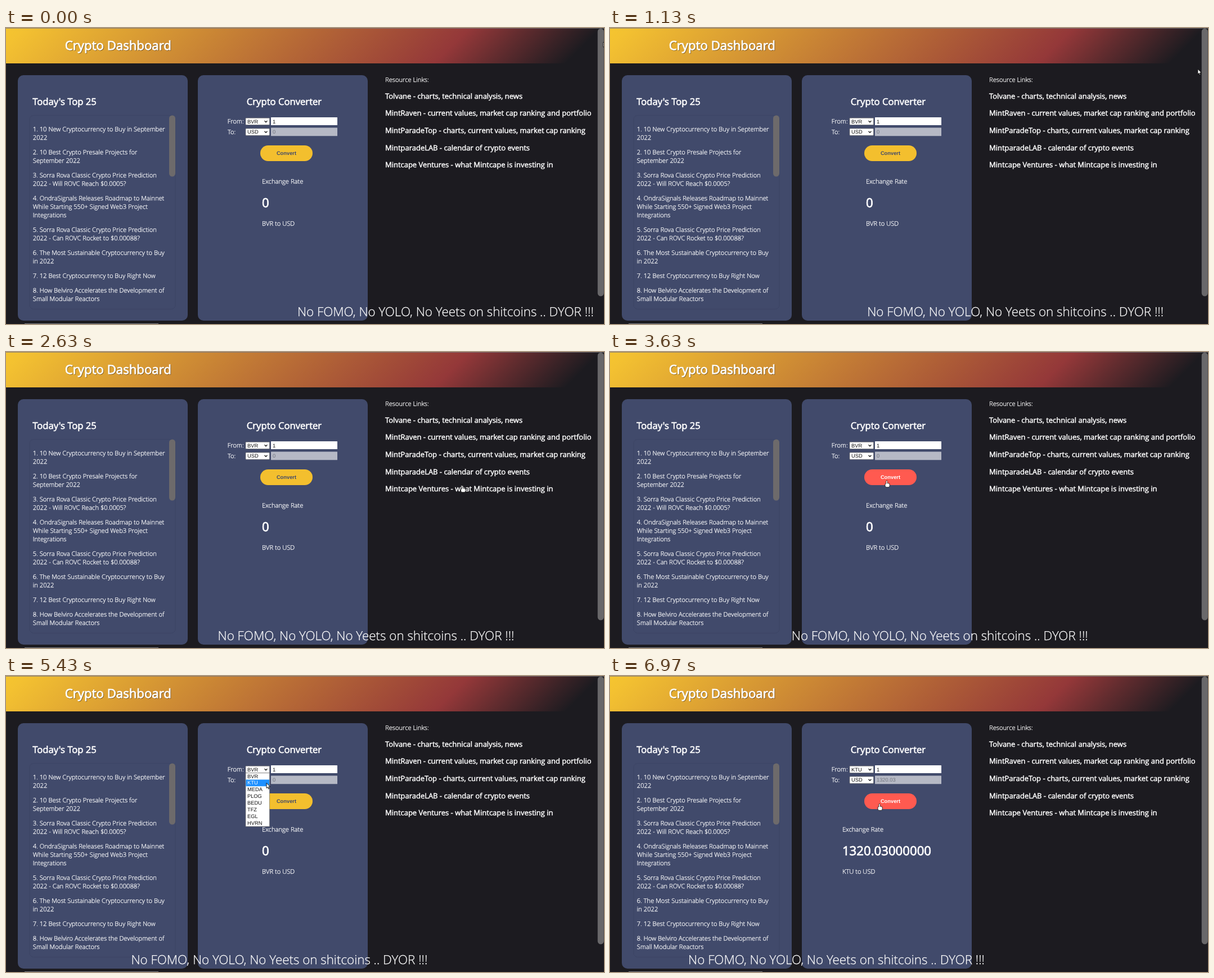
Write an HTML page with a canvas that moves like this. It is 1063 px wide and 527 px high and loops after 7.01 s.

```html
<!DOCTYPE html>
<html lang="en">
<head>
<meta charset="utf-8">
<title>Crypto Dashboard</title>
<style>
html, body { margin: 0; width: 100%; height: 100%; overflow: hidden; background: #1c1b20; }
canvas { display: block; width: 1063px; height: 527px; }
</style>
</head>
<body>
<canvas id="stage" width="1063" height="527"></canvas>
<script>
const ctx = document.getElementById('stage').getContext('2d');
const LOOP = 7010;
const HOVER_LAG = 80;
const OPEN_AT = 5100, PICK_AT = 5950, RESULT_AT = 6700;
const BASE = 11.1;
const H1 = BASE * 2, H2 = BASE * 1.5, H3 = BASE * 1.17;
const DARK = '#1c1b20', CARD = '#414a6b', GOLD = '#f3bf2e', RED = '#ff5a50';
const SANS = '"Open Sans", sans-serif';
const FORM = '"Liberation Sans", Arial, sans-serif';

const headlines = [
  ['1. 10 New Cryptocurrency to Buy in September', '2022'],
  ['2. 10 Best Crypto Presale Projects for', 'September 2022'],
  ['3. Sorra Rova Classic Crypto Price Prediction', '2022 - Will ROVC Reach $0.0005?'],
  ['4. OndraSignals Releases Roadmap to Mainnet', 'While Starting 550+ Signed Web3 Project', 'Integrations'],
  ['5. Sorra Rova Classic Crypto Price Prediction', '2022 - Can ROVC Rocket to $0.00088?'],
  ['6. The Most Sustainable Cryptocurrency to Buy', 'in 2022'],
  ['7. 12 Best Cryptocurrency to Buy Right Now'],
  ['8. How Belviro Accelerates the Development of', 'Small Modular Reactors']
];
const links = [
  'Tolvane - charts, technical analysis, news',
  'MintRaven - current values, market cap ranking and portfolio',
  'MintParadeTop - charts, current values, market cap ranking',
  'MintparadeLAB - calendar of crypto events',
  'Mintcape Ventures - what Mintcape is investing in'
];
const tickers = ['BVR', 'KTU', 'MEDA', 'PLOG', 'BEDU', 'TFZ', 'EGL', 'HVRN'];
const slogan = 'No FOMO, No YOLO, No Yeets on shitcoins .. DYOR !!!';

// Key points: time, then position
const sloganPath = [[0, 518], [4400, 281.5], [5430, 222.5], [LOOP, 137]];
const cursorPath = [
  [770, 1062, 25], [1130, 1045, 73], [2630, 811, 238], [3450, 491, 229], [4200, 491, 229],
  [4330, 483.5, 201], [4700, 456, 162], [5180, 456, 162], [5420, 463, 190.5],
  [PICK_AT, 463, 190.5], [6420, 478, 227.5]
];

function along(path, t) {
  let i = 1;
  while (i < path.length - 1 && t > path[i][0]) i++;
  const a = path[i - 1], b = path[i];
  const k = Math.min(1, Math.max(0, (t - a[0]) / (b[0] - a[0])));
  return a.slice(1).map((v, n) => v + (b[n + 1] - v) * k);
}

function box(x, y, w, h, r, fill, stroke) {
  ctx.beginPath();
  ctx.roundRect(x, y, w, h, r);
  if (fill) { ctx.fillStyle = fill; ctx.fill(); }
  if (stroke) { ctx.strokeStyle = stroke; ctx.lineWidth = 0.8; ctx.stroke(); }
}

function text(str, x, y, font, color, outline = 0) {
  ctx.font = font;
  ctx.fillStyle = ctx.strokeStyle = color;
  ctx.fillText(str, x, y);
  if (outline) {
    ctx.lineWidth = outline;
    ctx.strokeText(str, x, y);
  }
}

const form = (str, x, y, color = '#111') => text(str, x, y, `9.3px ${FORM}`, color);

// The thin face runs a little wider and is slightly thickened to stay bright
const light = (str, x, y, size = BASE) =>
  text(str, x, y, `300 ${size * 1.008}px ${SANS}`, '#fff', 0.28);

// Regular weight thickened by an outline, as browsers do without a bold face
const heavy = (str, x, y, size, color = '#fff') =>
  text(str, x, y, `400 ${size}px ${SANS}`, color, size / 27);

function header() {
  const g = ctx.createLinearGradient(247, -246, 803.5, 310.5);
  g.addColorStop(0, '#f5c52f');
  g.addColorStop(0.03, '#f3c131');
  g.addColorStop(0.74, '#943839');
  g.addColorStop(0.95, DARK);
  ctx.fillStyle = g;
  ctx.fillRect(0, 0, 1051, 63);
  ctx.fillStyle = '#77757a';
  ctx.fillRect(0, 0, 1063, 0.8);
  heavy('Crypto Dashboard', 105.8, 40.2, H1, 'rgba(60,50,40,0.4)');
  heavy('Crypto Dashboard', 104.8, 39.2, H1);
}

function newsCard() {
  box(21, 84, 302, 437, 10, CARD);
  heavy("Today's Top 25", 47.2, 136.5, H2);
  box(42, 155.5, 259, 345, 7, null, 'rgba(20,24,50,0.13)');
  box(290, 155.5, 11, 109, 5.5, '#6d6a6b');
  let y = 184;
  for (const lines of headlines) {
    for (const line of lines) {
      light(line, 47.8, y);
      y += 15;
    }
    y += 11;
  }
}

function select(y, value) {
  box(426, y, 42.4, 12.2, 1, '#fff', '#767676');
  form(value, 429, y + 9.3);
  ctx.beginPath();
  ctx.moveTo(459.6, y + 4.8);
  ctx.lineTo(462, y + 7.4);
  ctx.lineTo(464.4, y + 4.8);
  ctx.strokeStyle = '#111';
  ctx.lineWidth = 1.3;
  ctx.stroke();
}

function converterCard(t, hot) {
  const from = t < PICK_AT ? tickers[0] : tickers[1];
  const done = t >= RESULT_AT;
  box(341, 84, 302, 437, 10, CARD);
  heavy('Crypto Converter', 427.8, 136.5, H2);
  light('From:', 393.8, 169.6);
  light('To:', 394, 188.5);
  select(160.3, from);
  select(179, 'USD');
  box(471, 159, 118, 14, 0.5, '#fff');
  form('1', 474, 169.6);
  box(471, 177.5, 118, 14.8, 0.5, '#b6b9c5');
  form(done ? '1320.03' : '0', 474, 188.1, '#71757f');
  box(452, 209, 93, 28, 14, hot ? RED : GOLD);
  text('Convert', 480.9, 226.4, `bold 9.3px ${FORM}`, hot ? '#fff' : CARD);
  const x = done ? 412.9 : 455.1;
  light('Exchange Rate', x, 276.5);
  heavy(done ? '1320.03000000' : '0', x, 318.8, H1);
  light((done ? tickers[1] : tickers[0]) + ' to USD', x, 352);
}

function menu(y) {
  const top = 172.6, row = 11.86;
  const picked = Math.max(0, Math.floor((y - top) / row));
  box(426, top, 42.4, row * tickers.length + 0.4, 0, '#fff', '#767676');
  tickers.forEach((name, i) => {
    const rowTop = top + i * row;
    if (i === picked) {
      ctx.fillStyle = '#1e90ff';
      ctx.fillRect(426.4, rowTop, 41.6, row);
    }
    form(name, 429, rowTop + 8.9, i === picked ? '#fff' : '#111');
  });
}

const linkY = i => 125.8 + i * 30.65;

function linkAt([x, y]) {
  ctx.font = `400 ${H3}px ${SANS}`;
  return links.findIndex((s, i) =>
    Math.abs(y - linkY(i) + 4.6) < 9 && x > 674 && x < 674 + ctx.measureText(s).width);
}

const onButton = ([x, y]) => x > 452 && x < 545 && y > 209 && y < 237;

function resources(hot) {
  light('Resource Links:', 674, 95.6);
  links.forEach((s, i) => heavy(s, 674, linkY(i), H3, i === hot ? GOLD : '#fff'));
}

function arrow(x, y) {
  ctx.fillStyle = '#fff';
  ctx.strokeStyle = '#000';
  ctx.lineWidth = 0.9;
  const shape = new Path2D(`M${x} ${y}v9.2l2.1-1.9 1.4 3.3 1.5-.6-1.4-3.2 2.9-.2z`);
  ctx.fill(shape);
  ctx.stroke(shape);
}

function hand(x, y) {
  box(x, y, 2, 8, 1, '#fff', '#000');
  box(x - 2, y + 4.6, 8.2, 7.2, 2.6, '#fff', '#000');
  box(x + 0.4, y + 0.6, 1.2, 8, 0.6, '#fff');
}

function draw(t) {
  const pos = along(cursorPath, t);
  const past = along(cursorPath, t - HOVER_LAG);
  const open = t >= OPEN_AT && t < PICK_AT;
  ctx.textRendering = 'geometricPrecision';
  ctx.fillStyle = DARK;
  ctx.fillRect(0, 0, 1063, 527);
  header();
  newsCard();
  converterCard(t, !open && onButton(past));
  resources(linkAt(past));
  box(1051.7, 1, 11, 476.5, 5.5, '#69686a');
  ctx.fillStyle = '#858488';
  ctx.fillRect(33, 526, 238, 1);
  light(slogan, along(sloganPath, t)[0], 513, H1);
  if (open) menu(pos[1]);
  const pointing = !open && (onButton(pos) || linkAt(pos) >= 0);
  (pointing ? hand : arrow)(...pos);
}

function tick() {
  draw(performance.now() % LOOP);
  requestAnimationFrame(tick);
}
tick();
</script>
</body>
</html>
```
